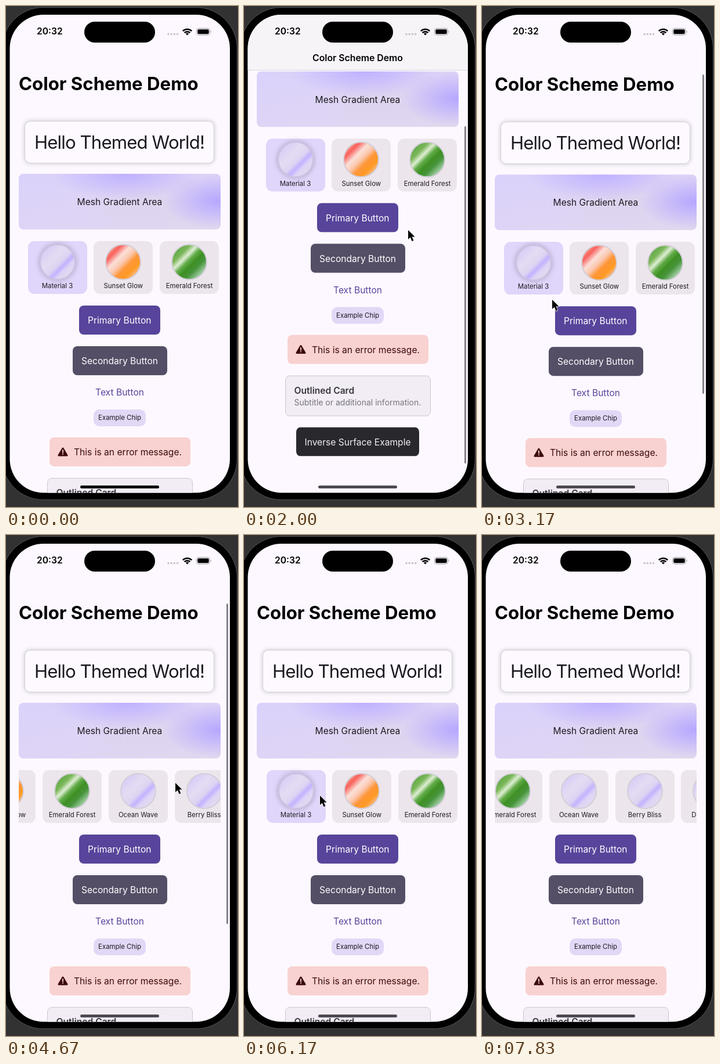
Recreate the animation shown at these times as an HTML page. Size 400 by 863 pixels, loop 8 s.

```html
<!DOCTYPE html>
<html lang="en">
<head>
<meta charset="utf-8">
<title>Color Scheme Demo</title>
<style>
html, body { margin: 0; width: 100%; height: 100%; overflow: hidden; background: #323232; }
.stage { position: relative; width: 400px; height: 863px; overflow: hidden;
  font: 400 15.6px Inter, "Open Sans", sans-serif; color: #1c1a20; white-space: nowrap; }
.stage * { box-sizing: border-box; }

/* Placed boxes: stage coordinates with centred content */
.box { position: absolute; left: var(--x); top: var(--y); width: var(--w); height: var(--h);
  display: flex; align-items: center; justify-content: center; border-radius: 8px; }
.layer { position: absolute; inset: 0; }

.phone { --x: -7px; --y: 2px; --w: 406px; --h: 849px; border-radius: 71px;
  background: #000; border: 1px solid #565656; }
.screen { background: #fdf8ff; clip-path: inset(15px 14px 24.5px 6.5px round 58px); }

.title { position: absolute; left: 22px; top: 114px; line-height: 40px;
  font-size: 31.2px; font-weight: 700; color: #000; }
.hello { --x: 32px; --y: 198px; --w: 327px; --h: 73px; border-radius: 10px; background: #fdf9ff;
  border: 1px solid #d2ced8; box-shadow: 0 0 7px 1px #d5d1da;
  font-size: 31.2px; letter-spacing: -.028em; }
.mesh { --x: 22px; --y: 289px; --w: 348px; --h: 96px;
  background:
    radial-gradient(ellipse 95px 48px at 345px 47px, #b7a7ff, #b7a7ff00),
    radial-gradient(ellipse 130px 44px at 185px 0, #c0b1ff, #c0b1ff00),
    radial-gradient(ellipse 130px 50px at 215px 52px, #ddd4ee, #ddd4ee00),
    linear-gradient(165deg, #dad2fb, #ded4f6 50%, #e1d8ee); }

.row { position: absolute; left: 22px; top: 400px; width: 348px; height: 101px; overflow: hidden; }
.cards { position: absolute; left: 15.5px; top: 5px; display: flex; gap: 11.8px; }
.card { flex: none; width: 102px; height: 91px; border-radius: 11px; background: #ece6ec;
  font-size: 11.4px; line-height: 14px; text-align: center; }
.card i { display: block; width: 62px; height: 62px; margin: 5px auto 2.5px; border-radius: 50%;
  border: 2px solid #d3ced8; background: var(--fill) border-box;
  --fill: linear-gradient(135deg, #d9cff6 18%, #e4dcf3 38%, #ded4f2 54%, #c3b1ff 63%, #ddd3f6 71%, #e3dbee 85%); }
.card.on { background: #e0d5fa; }
.card.on i { border-color: #cbc0df; box-shadow: 0 0 7px 2px #bdb1d2; }
.card .sunset { --fill: linear-gradient(135deg, #f9a08c 14%, #f9605c 24%, #fbe0d8 38%, #fbc7ae 50%, #ff9638 61%, #ff9a24 74%, #f8c3a0 88%); }
.card .forest { --fill: linear-gradient(135deg, #62ab48 16%, #7cb75a 28%, #deeed4 38%, #62ab48 47%, #3d9024 57%, #46943a 68%, #b4dabc 86%); }

.primary { --x: 125.5px; --y: 516px; --w: 140.5px; --h: 50px; background: #58449a; color: #fff; }
.secondary { --x: 114.5px; --y: 586px; --w: 163px; --h: 50px; background: #544e66; color: #fff; }
.text { --x: 140px; --y: 650px; --w: 112px; --h: 30px; color: #58449a; }
.chip { --x: 151px; --y: 694.5px; --w: 90px; --h: 29px; border-radius: 10px; background: #e1d8f6; font-size: 11.4px; }
.error { --x: 74.5px; --y: 743px; --w: 243px; --h: 50px; background: #f8d2d0; color: #3d0a0c; gap: 10px; }
.outlined { --x: 70.5px; --y: 813px; --w: 251px; --h: 70px; padding-left: 15px;
  background: #f2edf4; border: 1px solid #cbc6d0; justify-content: flex-start; }
.outlined b { display: block; font-weight: 600; line-height: 21px; color: #37343c; }
.outlined span { display: block; font-size: 14px; line-height: 20px; color: #78747e; }
.inverse { --x: 90px; --y: 902px; --w: 212px; --h: 50px; background: #29282c; color: #f2eef4; }

.nav { --x: 0; --y: 0; --w: 392px; --h: 111px; border-radius: 0; padding-top: 68px;
  background: #f7f4f8; border-bottom: 1px solid #d9d5dc; font-size: 15.8px; font-weight: 600; color: #000; }
.time { position: absolute; left: 53px; top: 34px; line-height: 20px; font-weight: 600; color: #000; }
.island { --x: 135px; --y: 27px; --w: 122px; --h: 36px; border-radius: 18px; background: #000; }
.home { --x: 128px; --y: 826px; --w: 136px; --h: 5px; border-radius: 3px; }
.bar { position: absolute; left: 380px; top: 118px; width: 3px; height: 552px;
  border-radius: 2px; background: #85828a; }
.cursor { position: absolute; left: 0; top: 0; width: 16px; height: 23px; overflow: visible; }

.scroll, .cards, .nav, .home, .bar, .cursor { animation: 8s linear infinite; }
.scroll { animation-name: scroll; }
.cards { animation-name: swipe; }
.nav { animation-name: nav; }
.home { animation-name: home; }
.bar { animation-name: bar, bar-fade; }
.cursor { animation-name: point, point-show; }

@keyframes scroll {
  0%, 15% { transform: none; animation-timing-function: cubic-bezier(.3, .4, .4, 1); }
  23.5%, 30% { transform: translateY(-176.5px); animation-timing-function: cubic-bezier(.3, .3, .5, 1); }
  36.5% { transform: translateY(7px); animation-timing-function: ease-out; }
  39.6% { transform: translateY(1.2px); }
  41.5%, 100% { transform: none; }
}
@keyframes swipe {
  0%, 44% { transform: none; animation-timing-function: cubic-bezier(.3, .3, .3, 1); }
  56.5%, 59% { transform: translateX(-202px); animation-timing-function: cubic-bezier(.3, .3, .3, 1); }
  65%, 67% { transform: translateX(-354px); animation-timing-function: cubic-bezier(.3, .3, .4, 1); }
  74% { transform: translateX(7px); animation-timing-function: ease-out; }
  77%, 78% { transform: translateX(1px); animation-timing-function: cubic-bezier(.3, .3, .3, 1); }
  91%, 100% { transform: translateX(-263px); }
}
@keyframes nav {
  0%, 16.6% { opacity: 0; }
  17.8%, 32.4% { opacity: 1; }
  33.6%, 100% { opacity: 0; }
}
@keyframes home {
  0%, 15% { background: #000; }
  17%, 100% { background: #4c4a50; }
}
@keyframes bar {
  0%, 15% { top: 118px; height: 552px; animation-timing-function: cubic-bezier(.3, .4, .4, 1); }
  23.5%, 30% { top: 207px; height: 581px; animation-timing-function: cubic-bezier(.3, .3, .5, 1); }
  36.5% { top: 118px; height: 545px; animation-timing-function: ease-out; }
  39.6% { top: 118px; height: 550px; }
  41.5%, 100% { top: 118px; height: 552px; }
}
@keyframes bar-fade {
  0%, 15% { opacity: 0; }
  16.5%, 60% { opacity: 1; }
  63%, 100% { opacity: 0; }
}
@keyframes point {
  0%, 10.6% { transform: translate(402px, 680px); animation-timing-function: ease-out; }
  14.4%, 15% { transform: translate(223px, 597px); animation-timing-function: ease-out; }
  23.5%, 27% { transform: translate(283px, 386px); animation-timing-function: ease-in-out; }
  38%, 41% { transform: translate(121px, 506px); animation-timing-function: ease-in-out; }
  50%, 60% { transform: translate(292px, 427px); animation-timing-function: ease-in-out; }
  74%, 78% { transform: translate(131px, 449px); animation-timing-function: ease-in-out; }
  86%, 100% { transform: translate(402px, 430px); }
}
@keyframes point-show {
  0%, 10.6% { opacity: 0; }
  10.7%, 85.9% { opacity: 1; }
  86%, 100% { opacity: 0; }
}
</style>
</head>
<body>
<div class="stage">
  <div class="box phone"></div>
  <div class="layer screen">
    <div class="layer scroll">
      <div class="title">Color Scheme Demo</div>
      <div class="box hello">Hello Themed World!</div>
      <div class="box mesh">Mesh Gradient Area</div>
      <div class="row">
        <div class="cards">
          <div class="card on"><i></i>Material 3</div>
          <div class="card"><i class="sunset"></i>Sunset Glow</div>
          <div class="card"><i class="forest"></i>Emerald Forest</div>
          <div class="card"><i></i>Ocean Wave</div>
          <div class="card"><i></i>Berry Bliss</div>
          <div class="card"><i></i>Desert Sand</div>
        </div>
      </div>
      <div class="box primary">Primary Button</div>
      <div class="box secondary">Secondary Button</div>
      <div class="box text">Text Button</div>
      <div class="box chip">Example Chip</div>
      <div class="box error">
        <svg width="18" height="16" viewBox="0 0 18 16">
          <path d="M9 2 16 14H2Z" fill="#3d0a0c" stroke="#3d0a0c" stroke-width="3" stroke-linejoin="round"/>
          <path d="M9 5v4.5M9 12v.2" stroke="#f8d2d0" stroke-width="1.8" stroke-linecap="round"/>
        </svg>
        This is an error message.
      </div>
      <div class="box outlined"><div><b>Outlined Card</b><span>Subtitle or additional information.</span></div></div>
      <div class="box inverse">Inverse Surface Example</div>
    </div>
    <div class="box nav">Color Scheme Demo</div>
    <div class="time">20:32</div>
    <div class="box island"></div>
    <svg class="layer" width="400" height="70">
      <path d="M280 48.5h19" stroke="#c6c2c9" stroke-width="3.6" stroke-linecap="round" stroke-dasharray="0 5.2"/>
      <g fill="none" stroke="#000" stroke-width="2.5">
        <path d="M304.8 43.2a11 11 0 0 1 15.4 0M307.6 46.2a7 7 0 0 1 9.8 0"/>
      </g>
      <path d="M312.5 50.5 309.8 47.8a4 4 0 0 1 5.4 0Z"/>
      <rect x="328.5" y="38.5" width="23" height="11.5" rx="3.6" fill="none" stroke="#a09da4"/>
      <rect x="330.2" y="40.2" width="19.6" height="8.1" rx="2.2"/>
      <path d="M353 42.5q2 1.7 0 3.6Z" fill="#a09da4"/>
    </svg>
    <div class="bar"></div>
    <div class="box home"></div>
  </div>
  <svg class="cursor" viewBox="0 0 18 26">
    <path d="M0 0V18L4.2 14.2 7.4 21.8 10.6 20.4 7.4 13H13Z" stroke="#fff" stroke-width="1.6" stroke-linejoin="round" paint-order="stroke"/>
  </svg>
</div>
</body>
</html>
```
